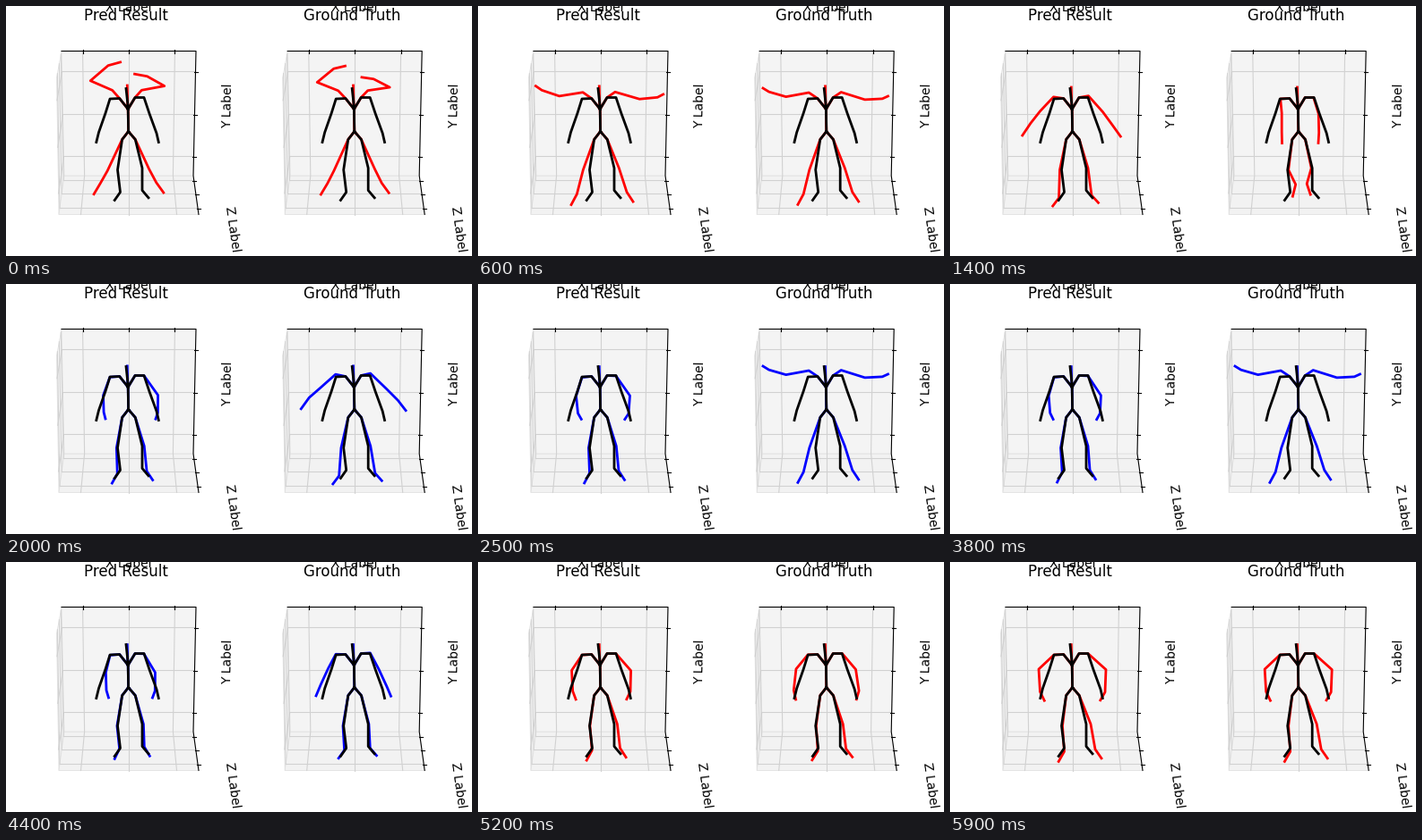
A matplotlib script for the animation above (6000 ms loop, 520 px wide and 280 px high).

```python
import matplotlib.pyplot as plt
import numpy as np
from matplotlib.animation import FuncAnimation

W, H, DPI = 520, 280, 100
FRAMES, STEP_MS = 60, 100
PANEL_DX = 252.2
PX = 72 / DPI  # one pixel in points
TILT = 0.08    # the left side swings a little higher than the right

# Resting joints: shoulder, elbow, wrist, hand, knee, ankle, foot.
REST = np.array([
    [[116, 103.5], [111, 119.5], [103.5, 141], [100.8, 152],
     [124.5, 183], [127.5, 208], [121.2, 217]],
    [[154, 102], [160, 120], [168, 142], [170.3, 152],
     [152, 181], [152, 206], [159, 214.3]],
])
HEAD, THROAT = [134, 92], [135.7, 108]
NECK, PELVIS = [136.2, 115], [136.6, 140]
COLLARS = [126.7, 103], [144, 102]
HIPS = [129.6, 149], [144.3, 149]


def pose(arm, leg, arm_drift=0, leg_drift=0):
    """Joint offsets from rest: mirrored on both sides, then drifting sideways."""
    left = np.array([*arm, *leg], float)
    both = np.stack([left * [1, 1 + TILT], left * [-1, 1 - TILT]])
    both[:, 1:4, 0] += arm_drift
    both[:, 4:, 0] += leg_drift * np.array([0.6, 1, 1])
    return both


UP = pose([(2.5, -8.5), (-16, -32), (10, -66), (25.5, -79)],
          [(-9, 1), (-18, -9), (-19, -6)], leg_drift=-3)
SIDE = pose([(1, -6.5), (-19.5, -17), (-31, -42), (-35, -56)],
            [(-6, 0), (-15, 2), (-15, 4.5)], leg_drift=-1.5)
OUT = pose([(-0.5, -2), (-10.5, -2), (-13.5, -9.5), (-20, -7)],
           [(-2, 0), (-6, 6), (-6.5, 6)])
DOWN = pose([(0.5, 0), (4, 0), (11.5, -0.5), (14.5, 1)],
            [(1, 0), (6, -8), (9, -4)], arm_drift=3)
HUNCH = pose([(0, 0.5), (-5.5, 5), (4, 3), (10.5, -1)],
             [(-1.7, 0), (-4, 3), (-3.5, 5)], arm_drift=4, leg_drift=1)
BENT = pose([(0, 0), (-13, 0), (-4, 3.5), (3.5, 2.5)],
            [(-2, 0), (-5, 3.5), (-5, 5.5)], arm_drift=1, leg_drift=5)

PREDICTED = [(0, 1.05 * UP), (6, 1.04 * SIDE), (14, OUT), (22, HUNCH),
             (34, HUNCH), (44, 0.2 * DOWN + 0.7 * HUNCH), (59, BENT)]
ACTUAL = [(0, UP), (6, SIDE), (10, OUT), (14, DOWN), (19, OUT), (25, SIDE),
          (31, UP), (38, SIDE), (44, 0.35 * OUT), (59, BENT)]


def move(script):
    """Joint positions for every frame, with smooth turns and no overshoot."""
    t = np.array([time for time, _ in script], float)
    v = np.array([REST + offset for _, offset in script])
    slope = np.diff(v, axis=0) / np.diff(t)[:, None, None, None]
    tangent = np.zeros_like(v)
    product, total = slope[:-1] * slope[1:], slope[:-1] + slope[1:]
    same = product > 0
    tangent[1:-1][same] = 2 * product[same] / total[same]
    path = []
    for frame in range(FRAMES):
        i = min(np.searchsorted(t, frame, "right"), len(t) - 1) - 1
        span = t[i + 1] - t[i]
        u = (frame - t[i]) / span
        ease = u * u * (3 - 2 * u)
        path.append(v[i] * (1 - ease) + v[i + 1] * ease
                    + span * u * (1 - u) * ((1 - u) * tangent[i] - u * tangent[i + 1]))
    return path


def skeleton(joints, tip):
    """One path through all bones, broken between the limbs."""
    chains = [[tip, THROAT, NECK, PELVIS]]
    for side, collar, hip in zip(joints, COLLARS, HIPS):
        chains += [[NECK, collar, *side[:4]], [PELVIS, hip, *side[4:]]]
    gap = [[np.nan, np.nan]]
    return np.vstack([np.vstack([chain, gap]) for chain in chains])


fig = plt.figure(figsize=(W / DPI, H / DPI), dpi=DPI, facecolor="white")
ax = fig.add_axes([0, 0, 1, 1])
ax.set_xlim(0, W)
ax.set_ylim(H - 0.5, -0.5)
ax.axis("off")

# Corners of the box: back wall, then the near edges of side wall and floor.
BACK_TL, BACK_TR = np.array([62, 50]), np.array([212, 50])
BACK_BL, BACK_BR = np.array([65, 189.5]), np.array([209, 189.5])
NEAR_TL = np.array([56.5, 80])
NEAR_BL, NEAR_BR = np.array([59, 233]), np.array([215, 233])


def mix(a, b, u):
    return a + (b - a) * u


def draw_path(points, dx, color, width, z):
    x, y = np.transpose(points)
    return ax.plot(x + dx, y, color=color, lw=width * PX, zorder=z,
                   solid_joinstyle="round")[0]


def draw_box(dx):
    panes = [
        ([BACK_TL, NEAR_TL, NEAR_BL, BACK_BL], "0.965"),
        ([BACK_BL, BACK_BR, NEAR_BR, NEAR_BL], "0.95"),
        ([BACK_TL, BACK_TR, BACK_BR, BACK_BL], "0.9585"),
    ]
    for corners, shade in panes:
        ax.fill(*(np.array(corners) + [dx, 0]).T, facecolor=shade,
                edgecolor="0.88", lw=0.8 * PX, zorder=0)

    def grid(*points):
        draw_path(points, dx, "0.82", 1.1, 1)

    def tick(x, y, ex, ey):
        draw_path([(x - ex, y - ey), (x + ex, y + ey)], dx, "black", 1.1, 2)

    for u in (0.157, 0.5, 0.843):
        top = mix(BACK_TL, BACK_TR, u)
        grid(top, mix(BACK_BL, BACK_BR, u), mix(NEAR_BL, NEAR_BR, u))
        tick(*top, 0, 2)
    for y in (73, 121, 168):
        u = (y - 50) / 139.5
        right = mix(BACK_TR, BACK_BR, u)
        grid(right, mix(BACK_TL, BACK_BL, u), mix(NEAR_TL, NEAR_BL, u))
        tick(right[0] + 0.7, y, 2, 0)
    for y in (195, 210, 226):
        u = (y - 189.5) / 43.5
        right = mix(BACK_BR, NEAR_BR, u)
        grid(right, mix(BACK_BL, NEAR_BL, u), mix(BACK_TL, NEAR_TL, u))
        tick(right[0] + 0.7, y, 2, 0)
    draw_path([BACK_TL, BACK_TR, BACK_BR, NEAR_BR], dx, "black", 1.1, 2)


def draw_labels(title, dx):
    font = dict(family="DejaVu Sans", color="black", ha="center", zorder=6)
    ax.text(133.7 + dx, 16, title, fontsize=12, va="baseline", **font)
    ax.text(137 + dx, 5, "X Label", fontsize=10, va="baseline", **font)
    ax.text(248 + dx, 111, "Y Label", fontsize=10, va="center",
            rotation=88.8, **font)
    ax.text(252.5 + dx, 249, "Z Label", fontsize=10, va="center",
            rotation=-82, **font)


panels = []
for title, dx, script in [("Pred Result", 0, PREDICTED),
                          ("Ground Truth", PANEL_DX, ACTUAL)]:
    draw_box(dx)
    draw_labels(title, dx)
    rest = skeleton(REST, HEAD)
    body = draw_path(rest, dx, "red", 2.78, 4)
    draw_path(rest, dx, "black", 2.78, 5)
    panels.append((body, dx, move(script)))


def update(frame):
    color = "blue" if 20 <= frame < 50 else "red"
    tip = [135.3, 88.5 + min(frame, 25) / 7]
    for body, dx, path in panels:
        x, y = skeleton(path[frame], tip).T
        body.set_data(x + dx, y)
        body.set_color(color)
    return [panel[0] for panel in panels]


anim = FuncAnimation(fig, update, frames=FRAMES, interval=STEP_MS,
                     repeat=True, repeat_delay=0, blit=False)
plt.show()
```
